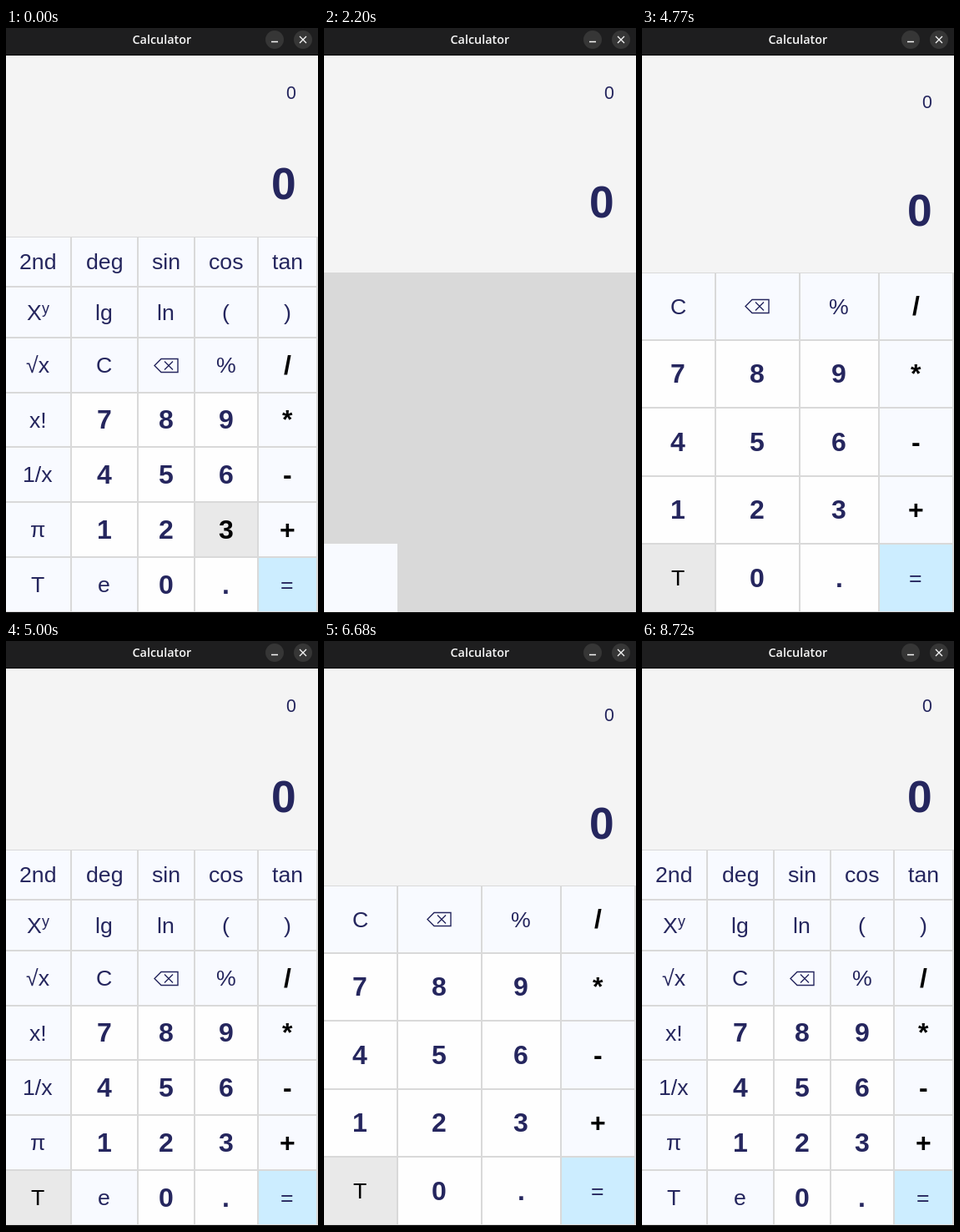
Recreate the animation shown at these times as an HTML page with a canvas. Size 374 by 701 pixels, loop 9730 ms.

```html
<!DOCTYPE html>
<html lang="en">
<head>
<meta charset="utf-8">
<title>Calculator</title>
<style>
html, body { margin: 0; width: 374px; height: 701px; overflow: hidden; background: #000; }
canvas { display: block; }
</style>
</head>
<body>
<canvas id="stage" width="374" height="701"></canvas>
<script>
const ctx = document.getElementById('stage').getContext('2d');
const LOOP = 9730;
const SANS = '"Liberation Sans", "DejaVu Sans", sans-serif';
const INK = '#25265e';
const LINE = '#d9d9d9';
const KEY = '#f8faff';

const full = {
  cols: [-1, 78, 158, 226, 302, 373],
  rows: [250, 310, 371, 437, 502, 568, 634, 700],
  keys: ['2nd deg sin cos tan', 'Xy lg ln ( )', '√x C ⌫ % /', 'x! 7 8 9 *',
         '1/x 4 5 6 -', 'π 1 2 3 +', 'T e 0 . ='],
  small: 85, big: 205
};
const compact = {
  cols: [-1, 88, 189, 284, 373],
  rows: [293, 374, 455, 537, 618, 700],
  keys: ['C ⌫ % /', '7 8 9 *', '4 5 6 -', '1 2 3 +', 'T 0 . ='],
  small: 96, big: 237
};

// Layout switches: start, end, layout before, layout after
const switches = [
  [1990, 2300, full, compact],
  [4660, 5000, compact, full],
  [6470, 6680, full, compact],
  [7740, 8040, compact, full]
];
// Key under the pointer from each time on
const hovers = [[0, '3'], [180, '2'], [290, '1'], [520, ''], [550, 'e'], [970, 'T'],
                [8430, 'e'], [8470, '2'], [8505, '3'], [8540, '']];
// Keys that repaint first after a switch, in order
const early = 'T e π 1/x x! √x ⌫ %'.split(' ');

const isDigit = key => /^[0-9.]$/.test(key);

function rect(x, y, w, h, color) {
  ctx.fillStyle = color;
  ctx.fillRect(x, y, w, h);
}

function lines(width, color, ...paths) {
  ctx.strokeStyle = color;
  ctx.lineWidth = width;
  ctx.beginPath();
  for (const [x, y, ...rest] of paths) {
    ctx.moveTo(x, y);
    for (let i = 0; i < rest.length; i += 2) ctx.lineTo(rest[i], rest[i + 1]);
  }
  ctx.stroke();
}

function text(s, x, y, size, color, weight = 400, family = SANS) {
  ctx.font = `${weight} ${size}px ${family}`;
  ctx.fillStyle = color;
  ctx.fillText(s, x, Math.floor(y));
}

// Centred text that starts on a whole pixel
function centered(s, x, y, size, color, weight) {
  ctx.font = `${weight || 400} ${size}px ${SANS}`;
  const w = Math.round(ctx.measureText(s).width);
  text(s, Math.floor(x - w / 2), y, size, color, weight);
}

function titleBar() {
  rect(0, 0, 374, 33, '#1e1e1f');
  rect(0, 32, 374, 1, '#080808');
  text('Calculator', 151.5, 19, 14.4, '#f7f7f7', 600, '"Open Sans", "Noto Sans", sans-serif');
  ctx.fillStyle = '#363636';
  for (const x of [322, 356]) {
    ctx.beginPath();
    ctx.arc(x, 14, 11, 0, 7);
    ctx.fill();
  }
  lines(1.3, '#f4f4f4', [318, 16.5, 326, 16.5], [352, 10, 360, 18], [360, 10, 352, 18]);
}

function display(small, big, bottom) {
  rect(0, 33, 374, bottom - 33, '#f4f4f4');
  text('0', 336, small, 21.33, INK);
  text('0', 318, big, 53.33, INK, 700);
}

function backspace(x, y) {
  lines(1.4, INK,
    [x - 14, y, x - 6, y - 8, x + 14, y - 8, x + 14, y + 8, x - 6, y + 8, x - 14, y, x - 13, y - 1],
    [x - 2, y - 5, x + 8, y + 5], [x + 8, y - 5, x - 2, y + 5]);
}

function label(key, x, y, hot) {
  const ink = hot ? '#000' : INK;
  if (key === '⌫') {
    backspace(Math.floor(x), Math.floor(y) + 0.5);
  } else if (key === 'Xy') {
    centered('X', x - 4, y + 9.5, 26.67, ink);
    centered('y', x + 9, y + 2, 18, ink);
  } else if (isDigit(key)) {
    centered(key, x, y + 11, 32, ink, 700);
  } else if ('/*-+'.includes(key)) {
    centered(key, x, y + 11, 32, '#000', 700);
  } else {
    centered(key, x, y + 9.5, 26.67, ink);
  }
}

function keyColor(key, hot) {
  if (hot) return '#e9e9e9';
  if (key === '=') return '#ccedff';
  return isDigit(key) ? '#fefefe' : KEY;
}

function eachKey(layout, visit) {
  const { cols, rows, keys } = layout;
  keys.forEach((row, r) => row.split(' ').forEach((key, c) =>
    visit(key, cols[c], rows[r], cols[c + 1] - cols[c], rows[r + 1] - rows[r])));
}

// While a switch is under way, the first keys appear bare, one after another
function bareKeys(layout, count) {
  eachKey(layout, (key, x, y, w, h) => {
    if (early.indexOf(key) >= 0 && early.indexOf(key) < count) rect(x, y, w, h, KEY);
  });
}

function keypad(layout, hover, done) {
  eachKey(layout, (key, x, y, w, h) => {
    const hot = key === hover;
    rect(x + 1, y + 1, w - 2, h - 2, keyColor(key, hot));
    if (done || early.includes(key)) label(key, x + w / 2, y + h / 2, hot);
  });
}

function draw(t) {
  const hover = hovers.filter(h => h[0] <= t).pop()[1];
  const [start, end, before, after] = switches.filter(s => s[0] <= t).pop() || [-1, 0, full, full];
  const p = Math.min(1, (t - start) / (end - start));
  const layout = p < 0.35 ? before : after;
  const bare = p >= 0.35 && p < 0.866;
  const { small } = bare ? before : layout;
  const big = bare ? (after === full ? 215 : 227) : layout.big;

  rect(0, 0, 374, 701, '#000');
  titleBar();
  display(small, big, layout.rows[0]);
  rect(0, layout.rows[0], 374, 700 - layout.rows[0], LINE);
  if (bare) bareKeys(layout, Math.floor((p - 0.35) / 0.416 * early.length));
  else keypad(layout, hover, p < 0.35 || p === 1);
}

function tick() {
  draw(performance.now() % LOOP);
  requestAnimationFrame(tick);
}
tick();
</script>
</body>
</html>
```
